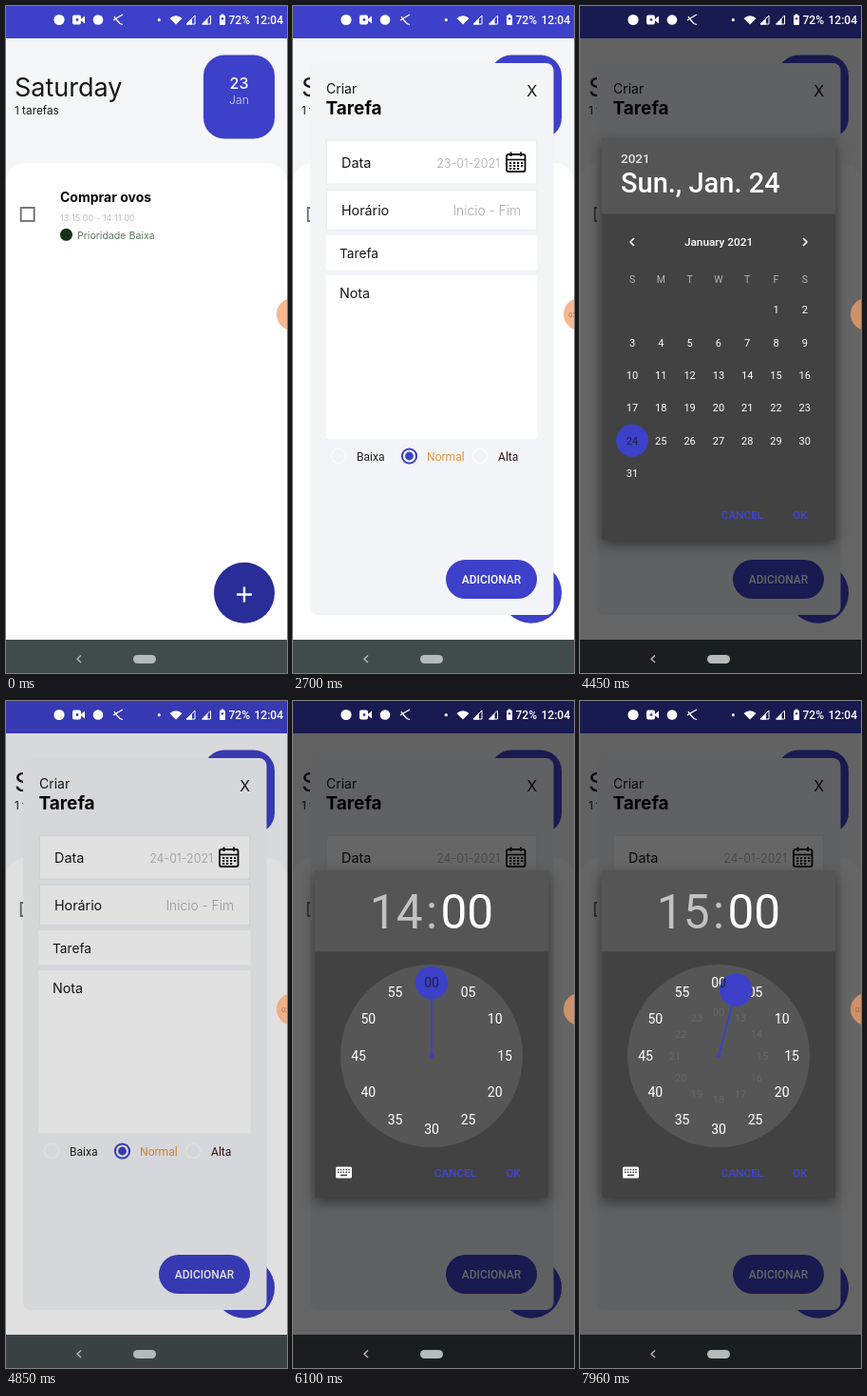
These frames come from a looping animation (296x701 px, 8000 ms). An HTML page with a canvas:

```html
<!DOCTYPE html>
<html lang="pt">
<head>
<meta charset="utf-8">
<title>Tarefas</title>
<style>
html, body { margin: 0; width: 100%; height: 100%; overflow: hidden; background: #fff; }
canvas { display: block; width: 296px; height: 701px; }
</style>
</head>
<body>
<canvas id="stage"></canvas>
<script>
const W = 296, H = 701, LOOP = 8000;
const BLUE = '#3d40c8', WHITE = '#fff', INK = '#16161a', GREY = '#a9a9ab';
const DIALOGS = [
  { kind: 'date', open: 3440, close: 4650, pick: 4230 },
  { kind: 'time', open: 4925, close: 6988, hour: 14, pickHour: 5720, turn: 5770, minute: 30, pickMinute: 6400 },
  { kind: 'time', open: 7330, close: 1e5, hour: 15, pickHour: 7700, turn: 7752, minute: 0, pickMinute: 1e5 }
];

const canvas = document.getElementById('stage');
const g = canvas.getContext('2d');
const dpr = window.devicePixelRatio || 1;
canvas.width = W * dpr;
canvas.height = H * dpr;

const ramp = (t, from, to) => Math.min(1, Math.max(0, (t - from) / (to - from)));
const pad = n => String(n).padStart(2, '0');
const inter = (size, weight = 400) => `${weight} ${size}px Inter, sans-serif`;
const roboto = (size, weight = 400) => `${weight} ${size}px Roboto, sans-serif`;

function text(s, x, y, font, color = INK, align = 'left') {
  g.font = font;
  g.fillStyle = color;
  g.textAlign = align;
  g.fillText(s, x, y);
}
function box(x, y, x2, y2, color, radius = 0) {
  g.fillStyle = color;
  g.beginPath();
  g.roundRect(x, y, x2 - x, y2 - y, radius);
  g.fill();
}
function disc(x, y, r, color) {
  g.fillStyle = color;
  g.beginPath();
  g.arc(x, y, r, 0, 7);
  g.fill();
}
function ring(x, y, r, color, width) {
  g.strokeStyle = color;
  g.lineWidth = width;
  g.beginPath();
  g.arc(x, y, r, 0, 7);
  g.stroke();
}
function line(points, color, width) {
  g.strokeStyle = color;
  g.lineWidth = width;
  g.beginPath();
  points.forEach(([x, y]) => g.lineTo(x, y));
  g.stroke();
}
function shape(points, color) {
  g.fillStyle = color;
  g.beginPath();
  points.forEach(([x, y]) => g.lineTo(x, y));
  g.fill();
}
function faded(alpha, draw) {
  if (alpha <= 0) return;
  g.save();
  g.globalAlpha *= alpha;
  draw();
  g.restore();
}

function home(pressed) {
  box(0, 0, W, H, '#f5f6f8');
  box(0, 165, W, 700, '#fefefe', [20, 20, 0, 0]);
  box(0, 0, W, 34, BLUE);
  box(0, 666, W, H, '#424b4c');
  text('Saturday', 9, 95, inter(27));
  text('1 tarefas', 9, 113.5, inter(11.8));
  box(208, 51.5, 283, 139.5, BLUE, 22);
  text('23', 245.5, 87, inter(16, 500), WHITE, 'center');
  text('Jan', 245.5, 103, inter(12.2, 300), '#d5d6f6', 'center');
  g.strokeStyle = '#6a6a70';
  g.lineWidth = 1.8;
  g.strokeRect(15.7, 212, 14, 14);
  text('Comprar ovos', 57, 206, inter(14, 700), '#08080a');
  text('13:15:00 - 14:11:00', 57, 226, inter(9.4, 300), '#adadad');
  disc(63.5, 240.3, 6.5, '#123214');
  text('Prioridade Baixa', 75, 244.5, inter(10.6), '#5d7b5e');
  disc(251, 616.8, 32, pressed ? '#2a2c98' : BLUE);
  line([[243, 618.5], [259, 618.5]], WHITE, 2.4);
  line([[251, 610.5], [251, 626.5]], WHITE, 2.4);
}

function calendarIcon() {
  g.strokeStyle = '#0c0c0e';
  g.lineWidth = 1.8;
  g.beginPath();
  g.roundRect(225, 156, 19.5, 18, 2);
  g.stroke();
  line([[225, 161.5], [244.5, 161.5]], '#0c0c0e', 1.6);
  for (const x of [229.5, 240]) line([[x, 153.5], [x, 158]], '#0c0c0e', 2);
  for (let i = 0; i < 11; i++) {
    box(228 + i % 4 * 4, 164 + (i >> 2) * 3, 230.2 + i % 4 * 4, 166 + (i >> 2) * 3, '#0c0c0e');
  }
}

function radio(x, label, labelX, color, on) {
  ring(x, 473, 7.6, on ? BLUE : '#fafbfc', on ? 2 : 1.6);
  if (on) disc(x, 473, 4.4, BLUE);
  text(label, labelX, 477.7, roboto(12.1), color);
}

function form(t) {
  box(18, 60, 274.5, 640, '#f2f4f7', 8);
  text('Criar', 35, 92, inter(14));
  text('Tarefa', 34.5, 113.5, inter(19, 700), '#050507');
  text('X', 251.7, 95, inter(16), INK, 'center');
  box(34.5, 140.5, 257.5, 188, '#eceef0');
  box(36, 142, 256, 186.5, WHITE);
  box(34.5, 192.5, 257.5, 236.5, '#eceef0');
  box(36, 194, 256, 235, WHITE);
  box(34.5, 241, 257.5, 277.5, WHITE);
  box(34.5, 283, 257.5, 454.5, WHITE);
  text('Data', 51, 169.5, inter(14.4));
  text(t < DIALOGS[0].close ? '23-01-2021' : '24-01-2021', 218, 169.5, inter(12.5, 300), GREY, 'right');
  calendarIcon();
  text('Horário', 51, 219.5, inter(14.3));
  text(t < DIALOGS[1].close ? 'Inicio - Fim' : '14:30 - Fim', 168.5, 219.5, inter(13.8, 300), GREY);
  text('Tarefa', 49, 264.5, inter(13.7));
  text('Nota', 49, 306.5, inter(14.3));
  radio(48, 'Baixa', 67, '#1d241d', false);
  radio(122.5, 'Normal', 141, '#e2943f', true);
  radio(197, 'Alta', 216, '#3a1614', false);
  box(161, 582, 257, 623, BLUE, 20.5);
  text('ADICIONAR', 209, 607, roboto(11.9, 500), WHITE, 'center');
}

function actions(y, pressed) {
  if (pressed) box(208, y - 22, 256, y + 14, 'rgba(190,190,175,.3)', 2);
  text('CANCEL', 171, y, roboto(11.7, 500), '#4144d6', 'center');
  text('OK', 232, y, roboto(11.7, 500), '#4144d6', 'center');
}

function panel(y, split, y2) {
  g.save();
  g.shadowColor = 'rgba(0,0,0,.45)';
  g.shadowBlur = 14 * dpr;
  g.shadowOffsetY = 5 * dpr;
  box(23, y, 269, y2, '#424242', 2);
  g.restore();
  box(23, y, 269, split, '#555', [2, 2, 0, 0]);
}

function dateDialog(d, t, body) {
  const day = t < d.pick ? 23 : 24;
  panel(139, 218.5, 561);
  text('2021', 43, 165, roboto(13.5, 500), '#e4e4e4');
  text(day === 23 ? 'Sat., Jan. 23' : 'Sun., Jan. 24', 43, 196, roboto(29, 500), WHITE);
  faded(body, () => {
    const col = i => 55 + 30.3 * i;
    text('January 2021', 146, 252, roboto(11.8, 500), WHITE, 'center');
    line([[57, 244], [53, 248], [57, 252]], WHITE, 1.6);
    line([[235, 244], [239, 248], [235, 252]], WHITE, 1.6);
    [...'SMTWTFS'].forEach((c, i) => text(c, col(i), 290.5, roboto(10.5), '#b5b5b5', 'center'));
    for (let n = 1; n <= 31; n++) {
      const cell = n + 4, x = col(cell % 7), y = 319.5 + 34.3 * Math.floor(cell / 7);
      if (n === day) disc(x, y, 17, BLUE);
      text(n, x, y + 3.8, roboto(11), n === day ? '#20203c' : WHITE, 'center');
    }
    actions(539, t > d.close - 120);
  });
}

function polar(angle, radius) {
  const a = angle * Math.PI / 180;
  return [146 + radius * Math.sin(a), 373 - radius * Math.cos(a)];
}
function dial(radius, size, color, label) {
  for (let i = 0; i < 12; i++) {
    const [x, y] = polar(i * 30, radius);
    text(label(i), x, y + size * .355, roboto(size), color, 'center');
  }
}

function keyboardIcon() {
  box(45, 489.5, 62, 501.5, WHITE, 1.5);
  for (let i = 0; i < 10; i++) {
    const x = 47 + i % 5 * 2.8, y = 491.7 + Math.floor(i / 5) * 2.8;
    box(x, y, x + 1.5, y + 1.5, '#424242');
  }
  box(50, 497.6, 57, 499.2, '#424242');
}

function timeDialog(d, t, body) {
  const hour = t < d.pickHour ? 0 : d.hour;
  const minute = t < d.pickMinute ? 0 : d.minute;
  const minutes = t >= d.turn, turn = ramp(t, d.turn, d.turn + 250);
  const shade = on => on ? WHITE : '#c2c2c2';
  panel(178, 263.5, 522);
  text(pad(hour), 136.5, 238.5, roboto(49.5), shade(!minutes), 'right');
  text(':', 146, 238.5, roboto(49.5), '#c2c2c2', 'center');
  text(pad(minute), 155.5, 238.5, roboto(49.5), shade(minutes), 'left');
  faded(body, () => {
    disc(146, 373, 96, '#565656');
    faded(1 - turn, () => {
      dial(77, 14, WHITE, i => i || 12);
      dial(46, 11, '#bdbdbd', i => i ? i + 12 : '00');
    });
    faded(Math.min(1, turn * 1.2), () => dial(77, 14, WHITE, i => pad(i * 5)));
    // the hand swings from the inner hour ring out to the minute ring
    const angle = hour * 30 % 360 * (1 - turn) + minute * 6;
    const [x, y] = polar(angle, 46 + 31 * turn);
    line([[146, 373], [x, y]], BLUE, 1.8);
    disc(146, 373, 2.4, BLUE);
    disc(x, y, 17.3, BLUE);
    const dark = '#20203c';
    if (!minutes) text(pad(hour), x, y + 3.9, roboto(11), dark, 'center');
    else if (turn === 1) text(pad(minute), x, y + 5, roboto(14), dark, 'center');
    else {
      const [zx, zy] = polar(0, 77);
      g.save();
      g.beginPath();
      g.arc(x, y, 17.3, 0, 7);
      g.clip();
      text('00', zx, zy + 5, roboto(14), dark, 'center');
      g.restore();
    }
    keyboardIcon();
    actions(500, t > d.close - 120);
  });
}

function systemIcons() {
  disc(56, 14.5, 5.6, WHITE);
  box(70, 9.5, 79, 19.5, WHITE, 2);
  shape([[78, 14.5], [83, 10.5], [83, 18.5]], WHITE);
  disc(75, 14.5, 1.4, BLUE);
  disc(97, 14.5, 5.3, WHITE);
  line([[113, 15], [116, 13], [123, 9]], WHITE, 1.3);
  line([[114, 11], [116, 14], [120, 18.5], [123, 19.5]], WHITE, 1.3);
  disc(161.3, 14.7, 1.6, WHITE);
  g.fillStyle = WHITE;
  g.beginPath();
  g.moveTo(179, 19.5);
  g.arc(179, 19.5, 9.2, -2.35, -.79);
  g.fill();
  for (const x of [190, 206.5]) {
    line([[x, 19], [x + 9, 10], [x + 9, 19], [x, 19]], WHITE, 1);
    shape([[x, 19.5], [x + 6, 13], [x + 6, 19.5]], WHITE);
  }
  box(225, 9.8, 231, 20, WHITE, 1);
  box(226.6, 8.6, 229.4, 10, WHITE);
  box(226.8, 12.2, 229.2, 14.4, BLUE);
  text('72%', 234.5, 18.8, roboto(12, 500), WHITE);
  text('12:04', 261.5, 18.8, roboto(12, 500), WHITE);
  line([[79, 682.5], [75, 686.3], [79, 690]], '#b9c0c0', 1.3);
  box(134, 682, 158, 691, '#b5bbbb', 4.5);
}

function bubble(t) {
  faded(.75, () => disc(302, 324, 17, '#f2a06b'));
  const lit = (t > 2600 && t < 3400) || (t > 4700 && t < 4950) || t > 7800;
  if (lit) text('02', 290, 327, roboto(8), 'rgba(120,70,50,.5)');
}

function frame(now) {
  const t = now % LOOP;
  g.setTransform(dpr, 0, 0, dpr, 0, 0);
  home(t < 320);
  if (t >= 320) form(t);
  const d = DIALOGS.find(o => t >= o.open && t < o.close + 250);
  if (d) {
    const dim = ramp(t, d.open, d.open + 280) * (1 - ramp(t, d.close, d.close + 250));
    const show = ramp(t, d.open, d.open + 170) * (1 - ramp(t, d.close, d.close + 132));
    const body = ramp(t, d.open + 110, d.open + 280);
    box(0, 0, W, H, `rgba(0,0,0,${.6 * dim})`);
    bubble(t);
    faded(show, () => (d.kind === 'date' ? dateDialog : timeDialog)(d, t, body));
  } else bubble(t);
  systemIcons();
  requestAnimationFrame(frame);
}
requestAnimationFrame(frame);
</script>
</body>
</html>
```
